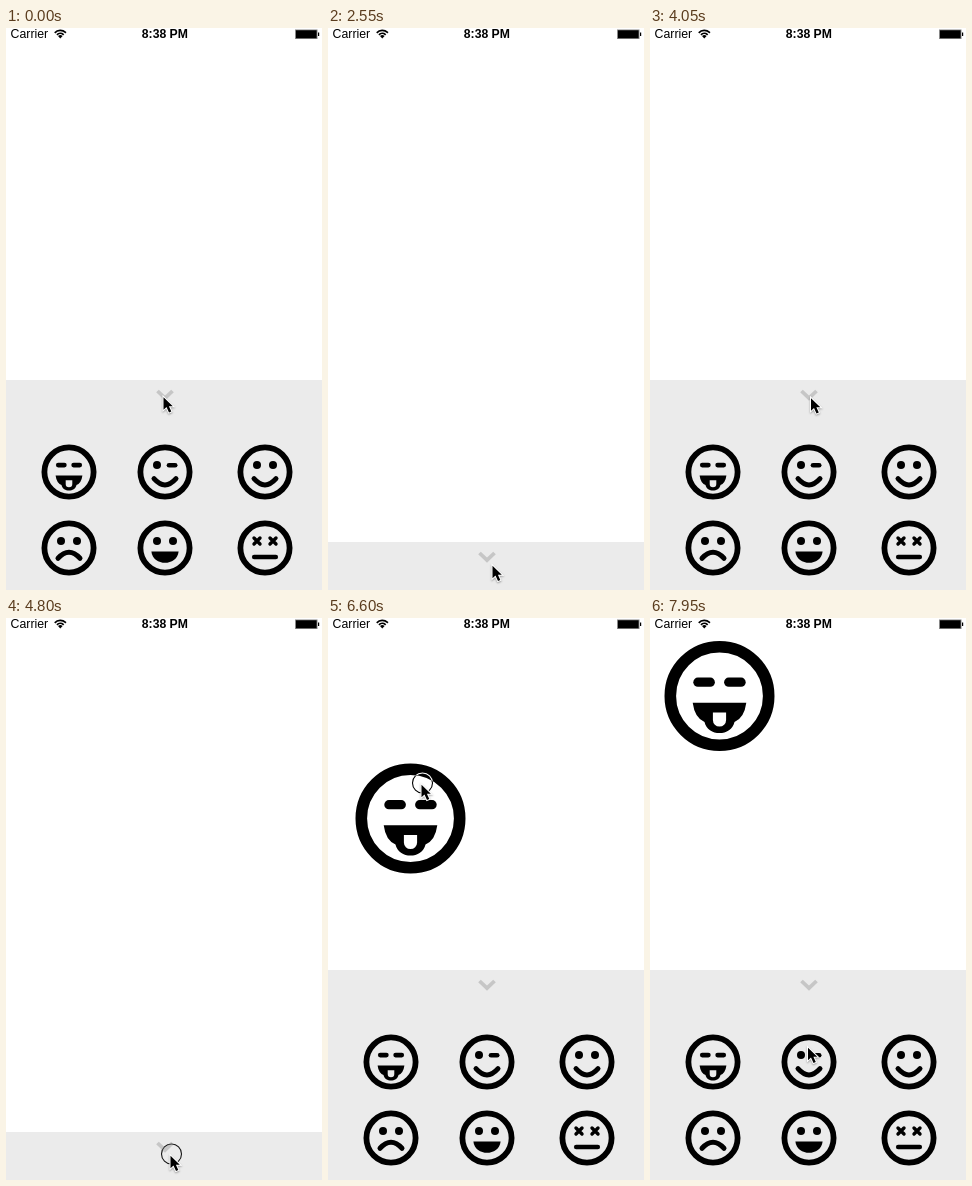
An HTML page with a canvas for the animation above (8 s loop, 316 by 562 pixels).

```html
<!DOCTYPE html>
<html lang="en">
<head>
<meta charset="utf-8">
<title>Sticker panel</title>
<style>
html, body { margin: 0; width: 100%; height: 100%; overflow: hidden; background: #fff; }
canvas { display: block; width: 316px; height: 562px; }
</style>
</head>
<body>
<canvas id="stage"></canvas>
<script>
const W = 316, H = 562, LOOP = 8000, STEP = 150;
const OPEN = 352, TRAVEL = 162;
const FIRST = 1950, BEAT = 1050, TOGGLES = 4, SLIDE = 300;
const GRAB = 5700, DROP = 7050;
const canvas = document.getElementById('stage');
const ctx = canvas.getContext('2d');
const dpr = window.devicePixelRatio || 1;
canvas.width = W * dpr;
canvas.height = H * dpr;

const ramp = (t, start, length) => Math.max(0, Math.min(1, (t - start) / length));
const smooth = u => u * u * (3 - 2 * u);
const mix = (a, b, u) => a + (b - a) * u;

// 0 = panel open, 1 = closed; it toggles on every beat
function closed(t) {
  let s = 0;
  for (let k = 0; k < TOGGLES; k++) {
    s = mix(s, 1 - k % 2, smooth(ramp(t, FIRST + k * BEAT, SLIDE)));
  }
  return s;
}

// Moves after the panel play: pick a face, drag it, flick, release, next face
const moves = [
  { at: 5100, time: 600, x: 71, y: 442 },
  { at: GRAB, time: 900, x: 92.5, y: 165 },
  { at: 6600, time: 300, x: 73.5, y: 24 },
  { at: 6900, time: 150, x: 79.5, y: 42.5 },
  { at: DROP, time: 150, x: 73, y: 59 },
  { at: 7350, time: 600, x: 157, y: 428 }
];

// The pointer trails the panel handle in a bow, then follows the moves
function pointer(t) {
  const s = closed(t - 230);
  let x = 156.5 + 3.5 * ramp(t, 600, 1200) + 3.5 * s + 30 * Math.sin(Math.PI * s);
  let y = 367.5 + ramp(t, 600, 1200) + 167.5 * s;
  for (const m of moves) {
    const u = ramp(t, m.at, m.time);
    x = mix(x, m.x, u);
    y = mix(y, m.y, u);
  }
  return [x, y];
}

function pressed(t) {
  const within = (start, end) => t >= start && t < end;
  const tap = (t - FIRST + 300) / BEAT;
  return within(300, 900) || within(GRAB, DROP) ||
    (tap >= 0 && tap < TOGGLES && tap % 1 < STEP / BEAT);
}

function stroke(d, width, color = '#000') {
  ctx.lineWidth = width;
  ctx.strokeStyle = color;
  ctx.stroke(new Path2D(d));
}

function fill(d) {
  ctx.fillStyle = '#000';
  ctx.fill(new Path2D(d), 'evenodd');
}

function circle(x, y, r) {
  ctx.beginPath();
  ctx.arc(x, y, r, 0, 2 * Math.PI);
}

function dot(x) {
  circle(x, -7, 4);
  ctx.fillStyle = '#000';
  ctx.fill();
}

const dots = () => { dot(-8); dot(8); };
const dash = (x, y, half) => stroke(`M${x - half} ${y}h${2 * half}`, 4.6);
const curve = (y, bend) => stroke(`M-11 ${y}Q0 ${y + bend} 11 ${y}`, 5);

const faces = {
  tongue() {
    dash(-7.7, -6.9, 3.1);
    dash(7.7, -6.9, 3.1);
    fill('M-13.4 3.4H13.4Q12.4 11 7.5 13C6 20.4 -6 20.4 -7.5 13Q-12.4 11 -13.4 3.4Z' +
         'M-3.3 8.2V12A3.3 3.3 0 0 0 3.3 12V8.2Z');
  },
  wink() { dot(-8); dash(7.1, -6.7, 3.1); curve(6.7, 12.5); },
  happy() { dots(); curve(6.7, 12.5); },
  sad() { dots(); curve(10.3, -12); },
  grin() { dots(); fill('M-13.6 3.5H13.6C12 18.6 -12 18.6 -13.6 3.5Z'); },
  dizzy() {
    for (const x of [-8, 8]) stroke(`M${x - 3} -10l6 6m0 -6l-6 6`, 3.4);
    dash(0, 9, 10.8);
  }
};

function face(name, x, y, scale = 1) {
  ctx.save();
  ctx.translate(x, y);
  ctx.scale(scale, scale);
  ctx.lineCap = 'round';
  circle(0, 0, 24.6);
  ctx.lineWidth = 5.8;
  ctx.strokeStyle = '#000';
  ctx.stroke();
  faces[name]();
  ctx.restore();
}

const columns = [63, 159, 259];

function panel(top) {
  ctx.fillStyle = '#ebebeb';
  ctx.fillRect(0, top, W, H - top);
  stroke(`M151.5 ${top + 11}l7.5 7.2l7.5 -7.2`, 3.8, '#c6c6c6');
  Object.keys(faces).forEach((name, i) => {
    face(name, columns[i % 3], top + 92 + 76 * Math.floor(i / 3));
  });
}

function statusBar() {
  ctx.fillStyle = '#000';
  ctx.font = '12.3px "Liberation Sans", Arial, sans-serif';
  ctx.fillText('Carrier', 4.6, 10.3);
  ctx.font = 'bold 12.2px "Liberation Sans", Arial, sans-serif';
  ctx.fillText('8:38 PM', 135.8, 10.3);
  for (const r of [4.6, 7.6]) {
    ctx.beginPath();
    ctx.arc(54.3, 10, r, -Math.PI * 0.76, -Math.PI * 0.24);
    ctx.lineWidth = 1.7;
    ctx.strokeStyle = '#000';
    ctx.stroke();
  }
  fill('M54.3 10.5L52 8Q54.3 6.1 56.6 8Z');
  ctx.fillStyle = '#888';
  ctx.fillRect(289, 1.5, 22.5, 9.5);
  ctx.fillStyle = '#000';
  ctx.fillRect(290, 2.3, 20.6, 7.9);
  ctx.fillRect(312, 4.5, 1.2, 3.5);
}

// Inverts what it crosses, so it shows on black as well
function pressRing(x, y) {
  ctx.save();
  ctx.globalCompositeOperation = 'difference';
  circle(x + 2, y, 10);
  ctx.lineWidth = 1.1;
  ctx.strokeStyle = '#fff';
  ctx.stroke();
  ctx.restore();
}

function arrow(x, y) {
  const d = 'M1 1.7V14.3L4 11.5L6.5 17L8.8 16L6.4 10.7H10.3Z';
  ctx.save();
  ctx.translate(x, y);
  ctx.shadowColor = 'rgba(0,0,0,.35)';
  ctx.shadowBlur = 2 * dpr;
  ctx.shadowOffsetY = dpr;
  stroke(d, 2, '#fff');
  ctx.shadowColor = 'transparent';
  fill(d);
  ctx.restore();
}

function draw(t) {
  ctx.setTransform(dpr, 0, 0, dpr, 0, 0);
  ctx.fillStyle = '#fff';
  ctx.fillRect(0, 0, W, H);
  panel(OPEN + TRAVEL * closed(t));
  if (t > GRAB) {
    const [gx, gy] = pointer(Math.min(t, DROP));
    face('tongue', gx - 10, gy + 35.5, 2);
  }
  statusBar();
  const [x, y] = pointer(t);
  if (pressed(t)) pressRing(x, y);
  arrow(x, y);
}

const begin = performance.now();
function tick() {
  const t = (performance.now() - begin) % LOOP;
  draw(Math.floor(t / STEP) * STEP);
  requestAnimationFrame(tick);
}
tick();
</script>
</body>
</html>
```
